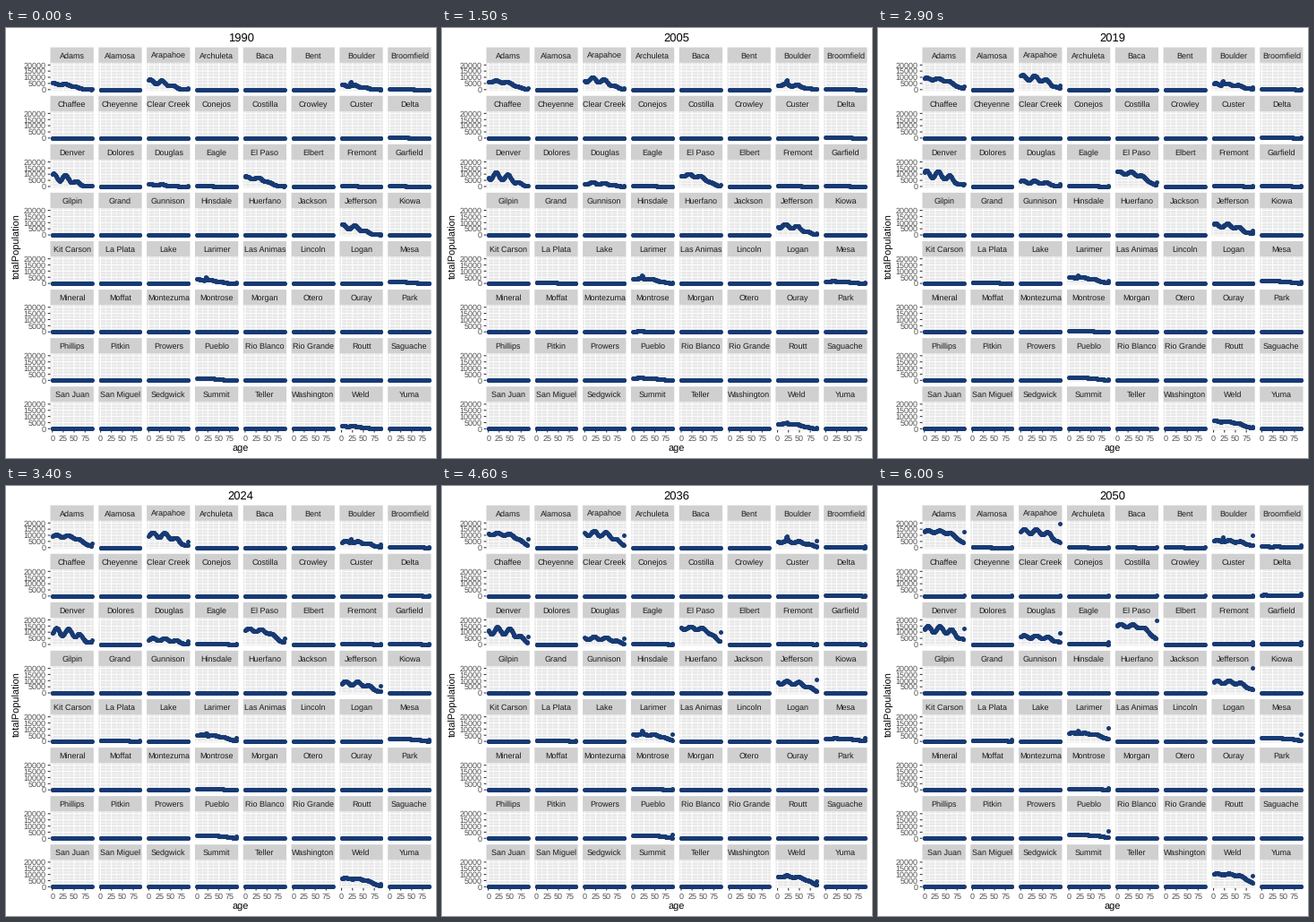
Write a matplotlib script that moves like this. It is 480 px wide and 480 px high and loops after 6100 ms.

```python
import matplotlib.pyplot as plt
import numpy as np
from matplotlib.animation import FuncAnimation
from matplotlib.collections import LineCollection
from matplotlib.patches import Rectangle

SIZE, DPI = 480, 80
PT = 72 / DPI  # points per pixel
plt.rcParams.update({"font.family": "Liberation Sans", "path.snap": False,
                     "text.hinting": "none"})

COUNTIES = """Adams,Alamosa,Arapahoe,Archuleta,Baca,Bent,Boulder,Broomfield,
Chaffee,Cheyenne,Clear Creek,Conejos,Costilla,Crowley,Custer,Delta,
Denver,Dolores,Douglas,Eagle,El Paso,Elbert,Fremont,Garfield,
Gilpin,Grand,Gunnison,Hinsdale,Huerfano,Jackson,Jefferson,Kiowa,
Kit Carson,La Plata,Lake,Larimer,Las Animas,Lincoln,Logan,Mesa,
Mineral,Moffat,Montezuma,Montrose,Morgan,Otero,Ouray,Park,
Phillips,Pitkin,Prowers,Pueblo,Rio Blanco,Rio Grande,Routt,Saguache,
San Juan,San Miguel,Sedgwick,Summit,Teller,Washington,Weld,Yuma"""
COUNTIES = COUNTIES.replace("\n", "").split(",")

# Thousands per year of age: level in 1990, level in 2050,
# strength of the generation wave, size of the 90+ group in 2050.
TINY = (.1, .2, .05, .3)
MEDIUM = (.4, .95, .1, 1.8)
TRAITS = dict.fromkeys(("Broomfield", "Delta", "Eagle", "Fremont",
                        "Garfield", "La Plata", "Montrose"), MEDIUM)
TRAITS |= {
    "Adams": (4.9, 13.4, .12, 13.0),
    "Arapahoe": (6.8, 13.4, .25, 19.4),
    "Boulder": (3.6, 5.6, .25, 10.3),
    "Denver": (7.8, 12.6, .38, 12.8),
    "Douglas": (1.7, 6.5, .33, 9.7),
    "El Paso": (7.5, 15.6, .13, 19.8),
    "Jefferson": (7.1, 9.1, .25, 20.6),
    "Larimer": (3.1, 6.8, .12, 10.7),
    "Mesa": (1.5, 2.9, .1, 6.2),
    "Pueblo": (1.8, 2.9, .06, 6.1),
    "Weld": (2.2, 10.5, .1, 8.8),
}
STUDENTS = {"Boulder": 3.4, "Larimer": 2.2, "Weld": .6}

AGES = np.arange(91)


def population(name, year):
    """Thousands of people at every age; the last entry is everyone over 89."""
    first, last, wave, oldest = TRAITS.get(name, TINY)
    t = (year - 1990) / 60
    level = first + (last - first) * t

    # Large generations were born around 1960, 1987 and 2015.
    born = year - AGES
    crest = np.cos(2 * np.pi * (born - 1960) / 27.5)
    generations = 1 + wave * (1 - .45 * t) * crest

    # Half the people are gone at an age that rises over the years.
    half_age = 52 + 27 * t ** .8
    survival = 1 / (1 + np.exp((AGES - half_age) / 11))

    students = STUDENTS.get(name, 0) * np.exp(-((AGES - 21) / 1.8) ** 2)
    pop = level * generations * survival + students
    pop[-1] = oldest * (.05 + .95 * t ** 2.6)
    return pop


# Facet geometry in pixels
LEFT, RIGHT, TOP, BOTTOM, GAP = 49.5, 474.5, 21.6, 448.8, 5.5
STRIP = 17.3
W = (RIGHT - LEFT - 7 * GAP) / 8
H = (BOTTOM - TOP - 7 * GAP) / 8 - STRIP
MAX_POP = 20.7


def px(age):
    return W * (age + 4.5) / 99


def py(pop):
    return H * (1 - (pop / MAX_POP + .05) / 1.1)


fig = plt.figure(figsize=(SIZE / DPI, SIZE / DPI), dpi=DPI, facecolor="white")
ax = fig.add_axes([0, 0, 1, 1])
ax.set(xlim=(0, SIZE), ylim=(SIZE, 0))
ax.axis("off")


def label(x, y, text, size=9, color="#4D4D4D", ha="center", **kw):
    return ax.text(x, y, text, size=size * PT, color=color, ha=ha,
                   va="baseline", **kw)


def lines(segments, width, color, z):
    ax.add_collection(LineCollection(segments, linewidths=width * PT,
                                     colors=color, zorder=z), autolim=False)


def grid(x0, y0, ages, pops):
    return ([[(x0, y0 + py(p)), (x0 + W, y0 + py(p))] for p in pops]
            + [[(x0 + px(a), y0), (x0 + px(a), y0 + H)] for a in ages])


AGE_TICKS = np.arange(0, 90, 25)
POP_TICKS = np.arange(0, 21, 5)

major, minor, ticks, dots = [], [], [], []
for i, name in enumerate(COUNTIES):
    row, col = divmod(i, 8)
    x0 = LEFT + col * (W + GAP)
    strip_y = TOP + row * (STRIP + H + GAP)
    y0 = strip_y + STRIP
    ax.add_patch(Rectangle((x0, strip_y), W, STRIP, color="#D0D0D0", lw=0))
    ax.add_patch(Rectangle((x0, y0), W, H, color="#E8E8E8", lw=0))
    label(x0 + W / 2, strip_y + 12, name, color="#1A1A1A")
    minor += grid(x0, y0, AGE_TICKS + 12.5, POP_TICKS[:-1] + 2.5)
    major += grid(x0, y0, AGE_TICKS, POP_TICKS)

    if col == 0:
        for pop in POP_TICKS:
            y = y0 + py(pop)
            ticks.append([(x0 - 2.75, y), (x0, y)])
            label(x0 - 4.9, y + 3.2, str(pop * 1000), ha="right")
    if row == 7:
        for age in AGE_TICKS:
            x = x0 + px(age)
            ticks.append([(x, BOTTOM), (x, BOTTOM + 2.75)])
            label(x, 461, str(age))

    line, = ax.plot(x0 + px(AGES), y0 + py(population(name, 1990)), "o",
                    ms=5 * PT, mew=0, color="#173A74", zorder=4)
    dots.append((name, y0, line))

lines(minor, .55, "white", 2)
lines(major, 1.07, "white", 2.5)
lines(ticks, 1.07, "#333333", 2.5)

MID_X = (LEFT + RIGHT) / 2
title = label(MID_X, 15, "1990", 13, "black")
label(MID_X, 472.6, "age", 11, "black")
label(16, (TOP + STRIP + BOTTOM) / 2, "totalPopulation", 11, "black",
      rotation=90, rotation_mode="anchor")


def update(frame):
    year = 1990 + frame
    title.set_text(str(year))
    for name, y0, line in dots:
        line.set_ydata(y0 + py(population(name, year)))
    return [title] + [line for _, _, line in dots]


anim = FuncAnimation(fig, update, frames=61, interval=100, repeat=True,
                     repeat_delay=0, blit=False)
plt.show()
```
